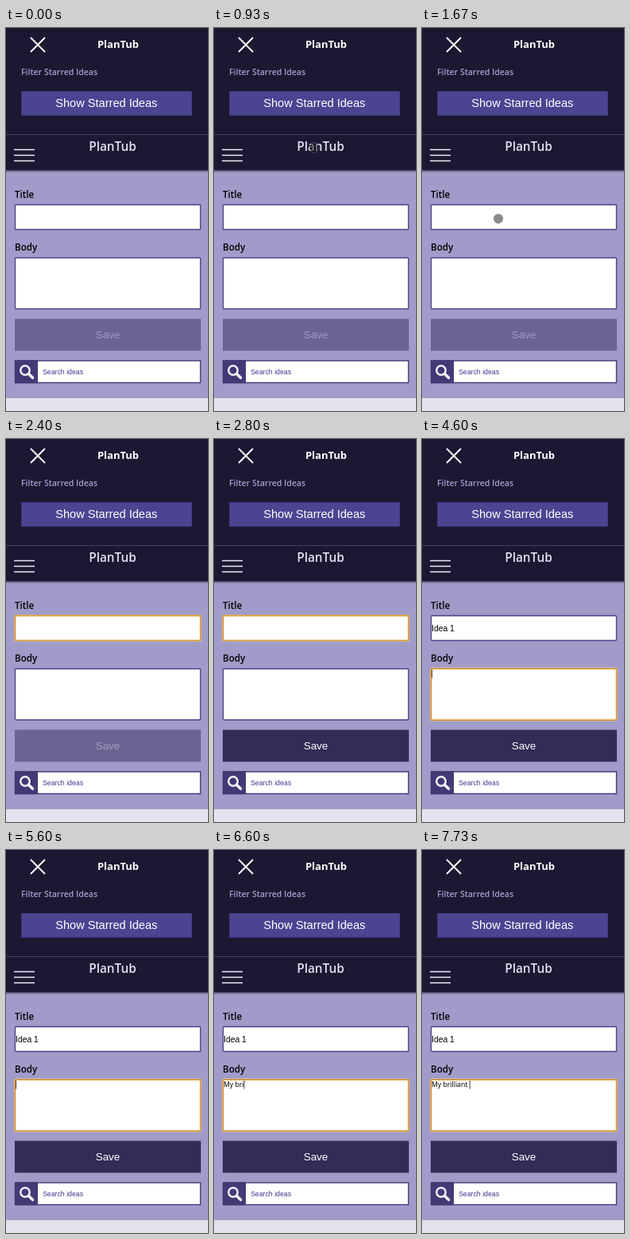
Animation of 254x480 px, one loop 8 s. Source, as an HTML page:

```html
<!DOCTYPE html>
<html lang="en">
<head>
<meta charset="utf-8">
<title>Idea form</title>
<style>
html, body { margin: 0; width: 100%; height: 100%; overflow: hidden; background: #1c1832; }
svg { display: block; width: 100vw; height: 100vh; }
text { white-space: pre; }
.open { font-family: "Open Sans", sans-serif; font-weight: 600; }
.bold { font-weight: 700; }
.arial { font-family: "Liberation Sans", Arial, sans-serif; }
.noto { font-family: "Noto Sans", sans-serif; }
.mid { text-anchor: middle; }
.field { fill: #fff; stroke: #4a4289; stroke-width: 1.4; }
.ring { fill: none; stroke: #f4dfb4; stroke-width: 3; }
.ring + .ring { stroke: #c98526; stroke-width: 1.3; }
</style>
</head>
<body>
<svg viewBox="0 0 254 480">
  <defs>
    <linearGradient id="shade" x1="0" y1="0" x2="0" y2="1">
      <stop offset="0" stop-color="#120e25" stop-opacity=".45"/>
      <stop offset="1" stop-color="#120e25" stop-opacity="0"/>
    </linearGradient>
  </defs>
  <rect width="254" height="480" fill="#1c1832"/>
  <path d="M0 133.5H254" stroke="#454058"/>
  <rect y="178.5" width="254" height="285" fill="#a19bc9"/>
  <rect y="178.5" width="254" height="3" fill="url(#shade)"/>
  <rect y="463.5" width="254" height="16.5" fill="#e5e2f0"/>

  <path d="M31 12L49 30M49 12L31 30" stroke="#fff" stroke-width="1.9"/>
  <text class="open bold mid" x="141" y="25" font-size="13" fill="#fff">PlanTub</text>
  <text class="open" x="19" y="59" font-size="10.5" fill="#a49ecd">Filter Starred Ideas</text>
  <rect x="19.5" y="79.5" width="214" height="30" fill="#4b4491" stroke="#3c3678"/>
  <text class="arial mid" x="126.3" y="99" font-size="14.6" fill="#fff">Show Starred Ideas</text>
  <path d="M10 152.5H36M10 159.5H36M10 166.5H36" stroke="#eceaf5" stroke-width="1.3"/>
  <text class="open mid" x="134" y="154" font-size="15.3" fill="#e4e1f3">PlanTub</text>

  <text class="open" x="11" y="213" font-size="11.6">Title</text>
  <rect class="field" x="11.5" y="221.5" width="233" height="31" rx="1"/>
  <text class="open" x="11" y="279" font-size="11.6">Body</text>
  <rect class="field" x="11.5" y="288" width="233" height="64" rx="1"/>
  <g id="titleRing">
    <rect class="ring" x="11.5" y="221.5" width="233" height="31" rx="1.5"/>
    <rect class="ring" x="11.2" y="221.2" width="233.6" height="31.6" rx="1.5"/>
  </g>
  <g id="bodyRing">
    <rect class="ring" x="11.5" y="288" width="233" height="64" rx="1.5"/>
    <rect class="ring" x="11.2" y="287.7" width="233.6" height="64.6" rx="1.5"/>
  </g>
  <text id="title" class="arial" x="12" y="240.5" font-size="10.4"></text>
  <text id="body" class="noto" x="12" y="297.3" font-size="8.6"></text>
  <path id="caret" stroke="#111" stroke-width=".8"/>

  <rect id="save" x="11" y="364.5" width="234" height="40"/>
  <text id="saveText" class="arial mid" x="128" y="389" font-size="13.4">Save</text>

  <rect x="11.5" y="417" width="233" height="27.5" fill="#fff" stroke="#423a75" stroke-width="1.4"/>
  <rect x="11" y="416.3" width="29" height="29" fill="#423a75"/>
  <circle cx="24" cy="429" r="5.7" fill="none" stroke="#f2f0f9" stroke-width="2.5"/>
  <path d="M28.5 433.5L33.5 438.3" stroke="#f2f0f9" stroke-width="3.6" stroke-linecap="round"/>
  <text class="arial" x="46" y="434" font-size="8.75" fill="#42378f">Search ideas</text>

  <circle id="touch" r="6.2" fill="#000" fill-opacity=".46" stroke="#fff" stroke-opacity=".3" stroke-width=".8"/>
</svg>
<script>
const LOOP = 8000, FOCUS_TITLE = 1870, FOCUS_BODY = 4600, SAVE_ON = 2800;
const $ = id => document.getElementById(id);
const pen = document.createElement('canvas').getContext('2d');

// each key: time and number of letters visible from then on
const fields = {
  title: { text: 'Idea 1', font: '10.4px "Liberation Sans", Arial, sans-serif',
    top: 231, bottom: 242.5, focus: FOCUS_TITLE,
    keys: [[2870, 1], [3270, 3], [3400, 4], [3870, 5], [4130, 6]] },
  body: { text: 'My brilliant ', font: '8.6px "Noto Sans", sans-serif',
    top: 289, bottom: 299.5, focus: FOCUS_BODY,
    keys: [[5870, 1], [6070, 2], [6200, 3], [6330, 4], [6470, 5], [6600, 6], [6730, 7],
      [6870, 8], [7070, 9], [7270, 10], [7400, 11], [7600, 12], [7730, 13]] }
};

const show = (id, on) => $(id).setAttribute('visibility', on ? 'visible' : 'hidden');

function typed(f, t) {
  let count = 0, last = f.focus;
  for (const [at, n] of f.keys) if (t >= at) [last, count] = [at, n];
  return { text: f.text.slice(0, count), last };
}

function drawCaret(f, state, t) {
  pen.font = f.font;
  const x = 12.6 + pen.measureText(state.text).width;
  $('caret').setAttribute('d', `M${x} ${f.top}V${f.bottom}`);
  show('caret', (t - state.last) % 1000 < 530);
}

function drawTouch(t) {
  show('touch', t >= 600 && t < FOCUS_TITLE);
  const p = Math.max(0, Math.min(1, (t - 600) / 670));
  const at = (a, c, b) => (1 - p) ** 2 * a + 2 * p * (1 - p) * c + p * p * b;
  $('touch').setAttribute('cx', at(215, 95, 96));
  $('touch').setAttribute('cy', at(98, 133, 239));
}

function draw(t) {
  const inTitle = t >= FOCUS_TITLE && t < FOCUS_BODY, inBody = t >= FOCUS_BODY;
  show('titleRing', inTitle);
  show('bodyRing', inBody);
  show('caret', false);
  for (const id in fields) {
    const f = fields[id], state = typed(f, t);
    $(id).textContent = state.text;
    if (id === 'title' ? inTitle : inBody) drawCaret(f, state, t);
  }
  const ready = t >= SAVE_ON;
  $('save').setAttribute('fill', ready ? '#322c56' : '#6a6492');
  $('saveText').setAttribute('fill', ready ? '#fff' : '#a39dc5');
  drawTouch(t);
}

const start = performance.now();
function frame() {
  draw((performance.now() - start) % LOOP);
  requestAnimationFrame(frame);
}
frame();
</script>
</body>
</html>
```
